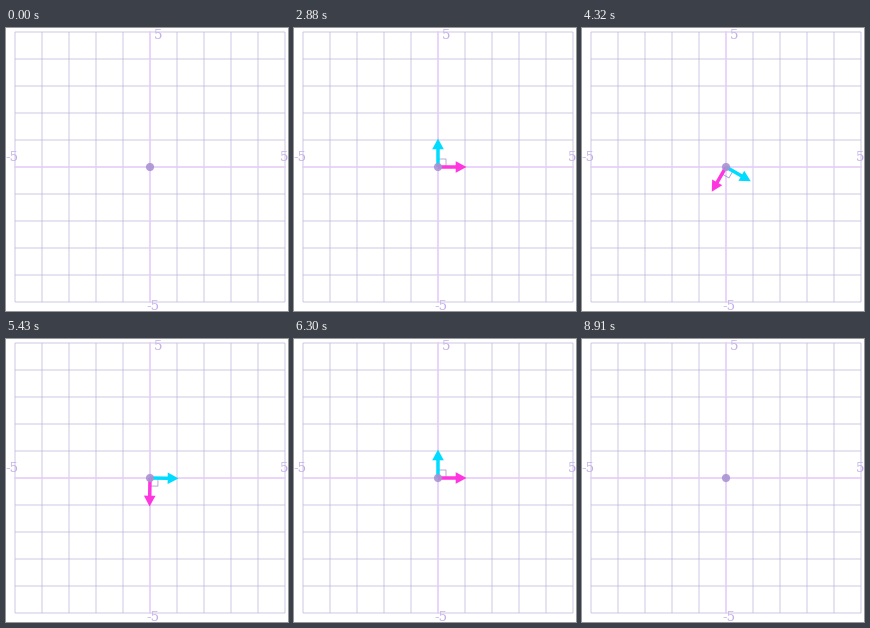
These frames come from a looping animation (282 by 283 pixels, 8970 ms). A matplotlib script:

```python
import numpy as np
import matplotlib.pyplot as plt
from matplotlib.animation import FuncAnimation
from matplotlib.patches import Circle, Polygon

W, H = 282, 283
STEP, LOOP = 30, 8970
CX, CY, UNIT = 144, 139, 27
REACH, HEAD = 28.5, 10.8
MAGENTA, CYAN = "#ff35e0", "#00dcff"
GRID, AXIS, LABEL, DOT = "#b9aed8", "#e5ccfa", "#c5afea", "#aa93d2"

fig = plt.figure(figsize=(W / 72, H / 72), dpi=72, facecolor="white")
ax = fig.add_axes([0, 0, 1, 1])
ax.set_xlim(0, W)
ax.set_ylim(H, 0)
ax.axis("off")


def draw_grid():
    half = 5 * UNIT
    for i in range(-5, 6):
        if i == 0:
            continue
        d = i * UNIT
        style = dict(color=GRID, lw=2, alpha=0.33, zorder=1,
                     solid_capstyle="butt", snap=False)
        ax.plot([CX + d] * 2, [CY - half, CY + half], **style)
        ax.plot([CX - half, CX + half], [CY + d] * 2, **style)
    style = dict(color=AXIS, lw=1.6, zorder=2)
    ax.plot([CX, CX], [CY - half, CY + half], **style)
    ax.plot([CX - half, CX + half], [CY, CY], **style)
    for x, y, s in [(148, 11, "5"), (140, 282, "-5"),
                    (-1, 133, "-5"), (273.5, 133, "5")]:
        ax.text(x, y, s, color=LABEL, size=13.4, family="DejaVu Serif", zorder=3)


def caption(left, right, y, first, second):
    """Bracketed pair, set flush to both ends of its box."""
    style = dict(color="black", size=20, family="Liberation Serif", zorder=8)
    return [ax.text(left, y, "[" + first, ha="left", **style),
            ax.text(right, y, second + "]", ha="right", **style)]


def ramp(t, start, end):
    return min(max((t - start) / (end - start), 0), 1)


def ease(u):
    return u * u * (3 - 2 * u)


def to_stage(points, angle):
    """Turn local points counterclockwise about the origin dot."""
    p = np.asarray(points, float)
    c, s = np.cos(angle), np.sin(angle)
    return np.column_stack([CX + p[:, 0] * c - p[:, 1] * s,
                            CY - p[:, 0] * s - p[:, 1] * c])


def arrow_shape(length):
    head = min(HEAD, length)
    neck = length - head
    w, b = 1.75, 5.8 * head / HEAD
    return [(0, w), (neck, w), (neck, b), (length, 0),
            (neck, -b), (neck, -w), (0, -w)]


def arrow(color, z):
    patch = Polygon(np.zeros((7, 2)), closed=True, fc=color, ec="none", zorder=z)
    return ax.add_patch(patch)


draw_grid()
corner, = ax.plot([], [], color="#8f80b8", lw=0.8, zorder=4, snap=False)
cyan = arrow(CYAN, 5)
magenta = arrow(MAGENTA, 6)
ax.add_patch(Circle((CX, CY), 4.1, fc=DOT, ec="none", alpha=0.9, zorder=7))
cap_x = caption(170.5, 210.5, 127, "1", "0")
cap_y = caption(105.5, 141, 104, "0", "1")


def update(i):
    t = i * STEP
    grow_x = ramp(t, 180, 630)
    grow_y = ramp(t, 1050, 1500)
    turn = ease(ramp(t, 3630, 4500)) - ease(ramp(t, 5400, 6300))
    angle = 1.5 * np.pi * turn
    visible = 1 - ramp(t, 8760, 8910)
    text_on = 1 - ramp(t, 2730, 2880)

    for patch, cap, grow, a in [(magenta, cap_x, grow_x, angle),
                                (cyan, cap_y, grow_y, angle + np.pi / 2)]:
        patch.set_xy(to_stage(arrow_shape(REACH * ease(grow)), a))
        patch.set_alpha(visible if grow > 0 else 0)
        for part in cap:
            part.set_alpha(grow * text_on)

    pts = to_stage([(8, 0), (8, 8), (0, 8)], angle)
    corner.set_data(pts[:, 0], pts[:, 1])
    corner.set_alpha(0.8 * visible * ramp(t, 630, 870))
    return [magenta, cyan, corner, *cap_x, *cap_y]


anim = FuncAnimation(fig, update, frames=LOOP // STEP, interval=STEP,
                     repeat=True, repeat_delay=0, blit=False)
plt.show()
```
